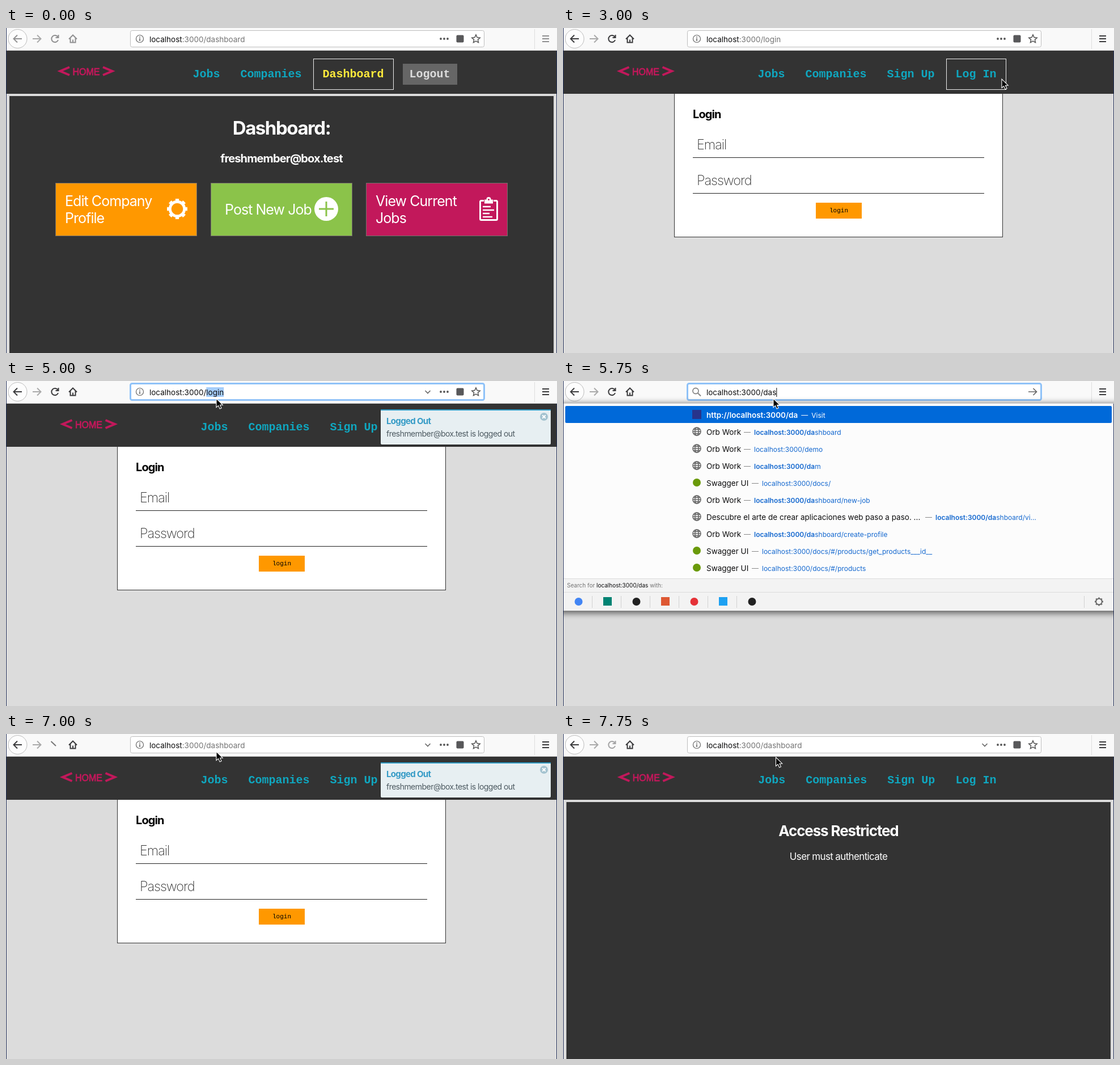
Animation, 972 px wide and 573 px high, one loop 8000 ms. Source, as an HTML page:

```html
<!DOCTYPE html>
<html lang="en">
<head>
<meta charset="utf-8">
<title>Logout and restricted access</title>
<style>
  html, body { margin: 0; width: 100%; height: 100%; overflow: hidden; background: #dcdcdc; }
  svg { display: block; width: 100%; height: 100%; }
  text { font-family: Inter, Roboto, sans-serif; white-space: pre; }
  .mono { font: bold 20px "Liberation Mono", monospace; fill: #0fa7c0; }
  .arial { font: 16px "Liberation Sans", sans-serif; }
  .tight { letter-spacing: -.038em; }
  .bold { font-weight: 600; }
  .title { font-weight: 700; letter-spacing: -.044em; }
  .thin { font-weight: 200; letter-spacing: -.044em; }
  .line { fill: none; stroke: #3b3b3d; stroke-width: 2; }
</style>
</head>
<body>
<svg id="stage" viewBox="0 0 972 573" preserveAspectRatio="none"></svg>
<script>
const LOOP = 8000;
const HOST = 'localhost:3000/';
const MAIL = 'freshmember@box.test';
const SITE = 'Orb Work';

const rect = (x, y, w, h, fill, more = '') =>
  `<rect x="${x}" y="${y}" width="${w}" height="${h}" fill="${fill}" ${more}/>`;
const disc = (x, y, r, fill, more = '') =>
  `<circle cx="${x}" cy="${y}" r="${r}" fill="${fill}" ${more}/>`;
const label = (x, y, size, fill, str, cls = '', more = '') =>
  `<text x="${x}" y="${y}" font-size="${size}" fill="${fill}" class="${cls}" ${more}>${str}</text>`;
const path = (d, more = '') => `<path class="line" d="${d}" ${more}/>`;
const group = (id, body, more = '') => `<g id="${id}" ${more}>${body}</g>`;
const centered = 'text-anchor="middle"';

const gear = (x, y, r, color) =>
  disc(x, y, r * .71, 'none', `stroke="${color}" stroke-width="${r * .27}"`) +
  disc(x, y, r * .88, 'none', `stroke="${color}" stroke-width="${r * .24}"
    pathLength="16" stroke-dasharray="1 1" stroke-dashoffset=".5"`);

const homeLink = x =>
  path(`M${x + 18.5},69 L${x + 2},76 L${x + 18.5},83 M${x + 77.5},69 L${x + 94},76 L${x + 77.5},83`,
    'style="stroke:#c2185b;stroke-width:4"') +
  label(x + 24, 83, 16, '#c2185b', 'HOME', 'arial', 'stroke="#c2185b" stroke-width=".8"');

const navItem = (x, str, fill) =>
  `<text class="mono" x="${x}" y="87" ${fill ? `style="fill:${fill}"` : ''}>${str}</text>`;
const outline = (x, w) => rect(x + .5, 54.5, w, 54, 'none', 'stroke="#eee"');
const navBar = rect(0, 40, 972, 76, '#333');
const guestNav = dx => navBar + homeLink(98 + dx) +
  navItem(343.5 + dx, 'Jobs') + navItem(427.5 + dx, 'Companies') +
  navItem(571.5 + dx, 'Sign Up') + navItem(692.5, 'Log In');
const darkPanel = rect(0, 116, 972, 457, '#dcdcdc') + rect(6, 120, 960, 453, '#333');

const card = (x, fill) => rect(x + .5, 273.5, 249, 93, fill, 'stroke="#77706c"');
const cardText = (x, y, str) => label(x, y, 25, '#fff', str, 'tight');

function dashboardPage() {
  const clip = `<g fill="none" stroke="#fff" stroke-width="3">
    <rect x="836.5" y="304.5" width="30" height="34" rx="2"/>
    <path d="M841 315H855M841 321H861M841 327H853M841 333H858" stroke-width="2.5"/></g>` +
    rect(843.5, 302, 16, 8, '#fff', 'stroke="#c2185b"') +
    disc(851.5, 302, 4, '#fff') + disc(851.5, 302.5, 1.5, '#c2185b');
  return navBar + homeLink(93.5) + navItem(329.5, 'Jobs') + navItem(413.5, 'Companies') +
    outline(542, 141) + navItem(558.5, 'Dashboard', '#ffeb3b') +
    rect(700, 63, 96, 37, '#666') + navItem(711.5, 'Logout', '#ddd') + darkPanel +
    label(486, 188, 33, '#fff', 'Dashboard:', 'title', centered) +
    label(486, 237, 20, '#fff', MAIL, 'title', centered) +
    card(87, '#ff9800') + cardText(104, 314, 'Edit Company') + cardText(104, 344, 'Profile') +
    gear(302, 319, 18, '#fff') +
    card(361, '#8bc34a') + cardText(386, 329, 'Post New Job') +
    disc(565, 319, 21, '#fff') + path('M552 319H578M565 306V332', 'style="stroke:#8bc34a;stroke-width:3"') +
    card(635, '#c2185b') + cardText(652, 314, 'View Current') + cardText(652, 344, 'Jobs') + clip;
}

function loginPage() {
  const field = (y, str) => label(236, y, 23.5, '#333', str, 'thin') +
    rect(229, y + 14, 514, 1, '#222');
  return rect(0, 116, 972, 457, '#dcdcdc') +
    rect(196.5, 100.5, 579, 268, '#fff', 'stroke="#333"') +
    guestNav(0) + outline(676, 105) +
    label(229, 159, 20, '#000', 'Login', 'title') +
    field(214, 'Email') + field(277, 'Password') +
    rect(446, 308, 81, 28, '#ff9800') +
    `<text x="486.5" y="325" ${centered} style="font:11px 'Liberation Mono',monospace">login</text>`;
}

const restrictedPage = () => guestNav(.8) + darkPanel +
  label(486, 180, 26, '#fff', 'Access Restricted', 'title', centered) +
  label(486, 222, 17, '#fff', 'User must authenticate', 'tight', centered);

const toast = () =>
  rect(660, 50, 302, 63, '#000', 'opacity=".2" rx="3"') +
  rect(661, 50, 300, 62, '#e7eff2', 'rx="2"') + rect(661, 50, 300, 2, '#2f9bc4') +
  label(671, 76, 15, '#359bc6', 'Logged Out', 'title') +
  label(671, 98, 14, '#4d5a61', MAIL + ' is logged out', 'tight') +
  disc(949, 63, 7, '#a4c3d0') +
  path('M946.2 60.2L951.8 65.8M951.8 60.2L946.2 65.8', 'style="stroke:#fff"');

function toolbar() {
  const star = Array.from({ length: 10 }, (_, i) => {
    const r = i % 2 ? 3.6 : 7.6, a = i * Math.PI / 5;
    return `${(829 + r * Math.sin(a)).toFixed(1)},${(19.5 - r * Math.cos(a)).toFixed(1)}`;
  }).join(' ');
  return rect(0, 0, 972, 40, '#f9f9f9') + rect(0, 39, 972, 1, '#cfcfcf') +
    disc(20.5, 19, 16.5, '#fdfdfd', 'stroke="#bbb"') +
    group('keys', path('M28 19H14M20 12.5L13.5 19L20 25.5') +
      group('reload', path('M91.5 16A6 6 0 1 0 92 21M92.5 12V17H87.5')) +
      path('M111 19.5L118 12.5L125 19.5M113.5 18V25.5H122.5V18M118 25V20.5') +
      path('M946 14H958M946 19H958M946 24H958')) +
    path('M47 19H61M55 12.5L61.5 19L55 25.5', 'style="stroke:#aaa"') +
    group('stop', path('M81 14L91 24M91 14L81 24')) +
    group('slash', path('M79.5 13L88 21', 'style="stroke:#777"')) +
    rect(932, 2, 1, 35, '#dedede') +
    group('halo', rect(215, 1.5, 633, 36.5, 'none', 'rx="6" stroke="#a9cdf8" stroke-width="4" opacity=".5"')) +
    rect(219.5, 4.5, 624, 29, '#fff', 'rx="3" stroke="#bdbdbd"') +
    group('ring', rect(219.5, 4.5, 624, 29, 'none', 'rx="3" stroke="#8fc2f8" stroke-width="3"')) +
    group('info', disc(236, 19, 6.5, 'none', 'stroke="#666" stroke-width="1.2"') +
      rect(235.2, 18, 1.6, 5, '#666') + rect(235.2, 15, 1.6, 1.8, '#666')) +
    group('find', disc(234, 17.5, 5, 'none', 'stroke="#888" stroke-width="1.8"') +
      path('M237.8 21.3L243 26.5', 'style="stroke:#888"')) +
    group('chevron', path('M739.5 17L744 21.5L748.5 17', 'style="stroke:#666;stroke-width:1.6"')) +
    group('actions', [767, 773, 779].map(x => disc(x, 19, 1.9, '#555')).join('') +
      rect(794.5, 12.5, 13, 13, '#58585a', 'rx="2"') +
      `<polygon points="${star}" fill="none" stroke="#555" stroke-width="1.5"/>`) +
    group('go', path('M821 19H835M829.5 13L835.5 19L829.5 25', 'style="stroke:#666;stroke-width:1.7"')) +
    rect(253, 11, 0, 17, '#a5cdfb', 'id="select"') +
    label(253, 24.5, 13.5, '#0c0c0d', '', '', 'id="url"') +
    rect(0, 12, 1, 16, '#000', 'id="caret"');
}

const globe = y => `<g fill="none" stroke="#666" stroke-width="1.6"><circle cx="236" cy="${y}" r="7"/>
  <ellipse cx="236" cy="${y}" rx="3.2" ry="7"/><path d="M229 ${y}H243M230.5 ${y - 3.6}H241.5M230.5 ${y + 3.6}H241.5"/></g>`;

const hits = [
  [SITE, 'dashboard'], [SITE, 'demo'], [SITE, 'dam'], ['Swagger UI', 'docs/'],
  [SITE, 'dashboard/new-job'],
  ['Descubre el arte de crear aplicaciones web paso a paso. ...', 'dashboard/vi...'],
  [SITE, 'dashboard/create-profile'],
  ['Swagger UI', 'docs/#/products/get_products___id__'], ['Swagger UI', 'docs/#/products']
];

function hitRow([title, tail], i, match) {
  const y = 90 + 30 * i, docs = title === 'Swagger UI';
  const x = docs ? 351 : title === SITE ? 337 : 657;
  const url = HOST + tail, n = tail.startsWith(match) ? HOST.length + match.length : 0;
  return (docs ? disc(236, y - 1, 7, '#6a9a0a') : globe(y - 1)) +
    label(253, y + 5, 13.5, '#0c0c0d', title) + rect(x - 18, y, 12, 1, '#888') +
    label(x, y + 4.5, 12, '#1468cf', `<tspan class="bold">${url.slice(0, n)}</tspan>${url.slice(n)}`);
}

function panel(typed, match, rows) {
  const y = 48 + 30 * rows;
  const engines = ['#4285f4', '#008373', '#222', '#de5833', '#e53238', '#1da1f2', '#222'];
  return rect(-20, 40, 1012, y + 21, '#000', 'filter="url(#soft)" opacity=".6"') +
    rect(0, 40, 972, y + 17, '#fcfcfc') + rect(0, 39, 972, 1, '#d0d0d0') +
    rect(4, 44, 964, 30, '#0069d9', 'rx="2"') + rect(228, 51, 16, 16, '#28348c') +
    label(253, 64.5, 13.5, '#fff', `<tspan class="bold">http://${HOST + match}</tspan>` +
      '<tspan dx="6" font-size="12">—</tspan><tspan dx="6" font-size="12">Visit</tspan>') +
    hits.slice(0, rows - 1).map((h, i) => hitRow(h, i, match)).join('') +
    `<g transform="translate(0 ${y - 348})">` +
    rect(0, 348, 972, 57, '#f3f3f3') + rect(0, 348, 972, 1, '#dcdcdc') + rect(0, 372, 972, 1, '#dcdcdc') +
    label(7, 364, 10, '#737373', `Search for <tspan fill="#0c0c0d">${HOST + typed}</tspan> with:`) +
    engines.map((c, i) => (i % 2 ? rect(20 + 51 * i, 381, 15, 15, c) : disc(27.5 + 51 * i, 389, 7, c)) +
      (i < 6 ? rect(51 + 51 * i, 379, 1, 21, '#d2d2d2') : '')).join('') +
    rect(919, 379, 1, 21, '#d2d2d2') + gear(945.5, 389, 7.5, '#6b6b6b') + '</g>';
}

const stage = document.getElementById('stage');
stage.innerHTML =
  '<defs><filter id="soft" x="-5%" y="-5%" width="110%" height="120%"><feGaussianBlur stdDeviation="6"/></filter></defs>' +
  rect(0, 0, 972, 573, '#dcdcdc') +
  group('dashboard', dashboardPage()) + group('login', loginPage()) +
  group('restricted', restrictedPage()) + group('toast', toast()) +
  toolbar() + group('panel', '') +
  rect(0, 0, 1, 573, '#27345c') + rect(971, 40, 1, 533, '#27345c') +
  group('cursor', '<path d="M0 0V15.5L3.6 12.3L6.2 18L9 16.8L6.5 11.2H11.2Z" fill="#000" stroke="#fff" stroke-width="1.1"/>');

const el = {};
stage.querySelectorAll('[id]').forEach(e => el[e.id] = e);
const show = (id, on) => el[id].setAttribute('display', on ? 'inline' : 'none');

// Each entry holds from its time until the next one.
const pointer = [[250, 815, 168], [1750, 774, 90], [3500, 752, 118], [3750, 571, 194],
  [4000, 446, 94], [4250, 372, 35], [4750, 371, 31], [7750, 375.5, 41]];
const typing = [[5500, 'da', 'd'], [5750, 'das', 'da'], [6000, 'dash', 'das'],
  [6250, 'dashbo', 'dash'], [6500, 'dashboar', 'dashbo'], [6750, 'dashboard', 'dashboar']];
const at = (list, t) => list.filter(s => s[0] <= t).pop();

function drawUrl(t, open, focus, typed) {
  const tail = open ? typed : t < 3000 || t >= 7000 ? 'dashboard' : 'login';
  const grey = focus ? '#0c0c0d' : '#737373';
  el.url.innerHTML = `localhost<tspan fill="${grey}">${HOST.slice(9) + tail}</tspan>`;
  const end = 253 + el.url.getComputedTextLength();
  const from = t < 4750 ? 253 : el.url.getStartPositionOfChar(HOST.length).x;
  const marked = focus && !open && (t < 4750 || t >= 5000);
  el.select.setAttribute('x', from);
  el.select.setAttribute('width', marked ? end - from : 0);
  el.caret.setAttribute('x', end);
  show('caret', open);
}

let last = -1;
function draw(time) {
  const t = Math.floor(time % LOOP / 250) * 250;
  if (t === last) return;
  last = t;
  const open = t >= 5500 && t < 7000, focus = t >= 4250 && t < 7000;
  const [, typed, match] = at(typing, t) || [0, '', ''];

  show('dashboard', t < 3000);
  show('login', t >= 3000 && t < 7250);
  show('restricted', t >= 7250);
  show('toast', t >= 3250 && t < 7250);
  el.toast.setAttribute('transform', `translate(${t < 3500 ? 9 : 0} 0)`);

  el.keys.setAttribute('opacity', t < 1000 ? .55 : 1);
  el.reload.setAttribute('opacity', t >= 7750 ? .45 : 1);
  show('reload', t < 7000 || t >= 7750);
  show('slash', t === 7000);
  show('stop', t === 7250 || t === 7500);
  show('halo', t === 4250);
  show('ring', focus && t > 4250);
  show('info', !open);
  show('find', open);
  show('actions', !open);
  show('go', open);
  show('chevron', t >= 4250 && !open);
  drawUrl(t, open, focus, typed);

  el.panel.innerHTML = open ? panel(typed, match, t < 5750 ? 5 : 10) : '';
  const spot = at(pointer, t);
  show('cursor', spot);
  if (spot) el.cursor.setAttribute('transform', `translate(${spot[1]} ${spot[2]})`);
}

const start = performance.now();
function tick() {
  draw(performance.now() - start);
  requestAnimationFrame(tick);
}
tick();
</script>
</body>
</html>
```
